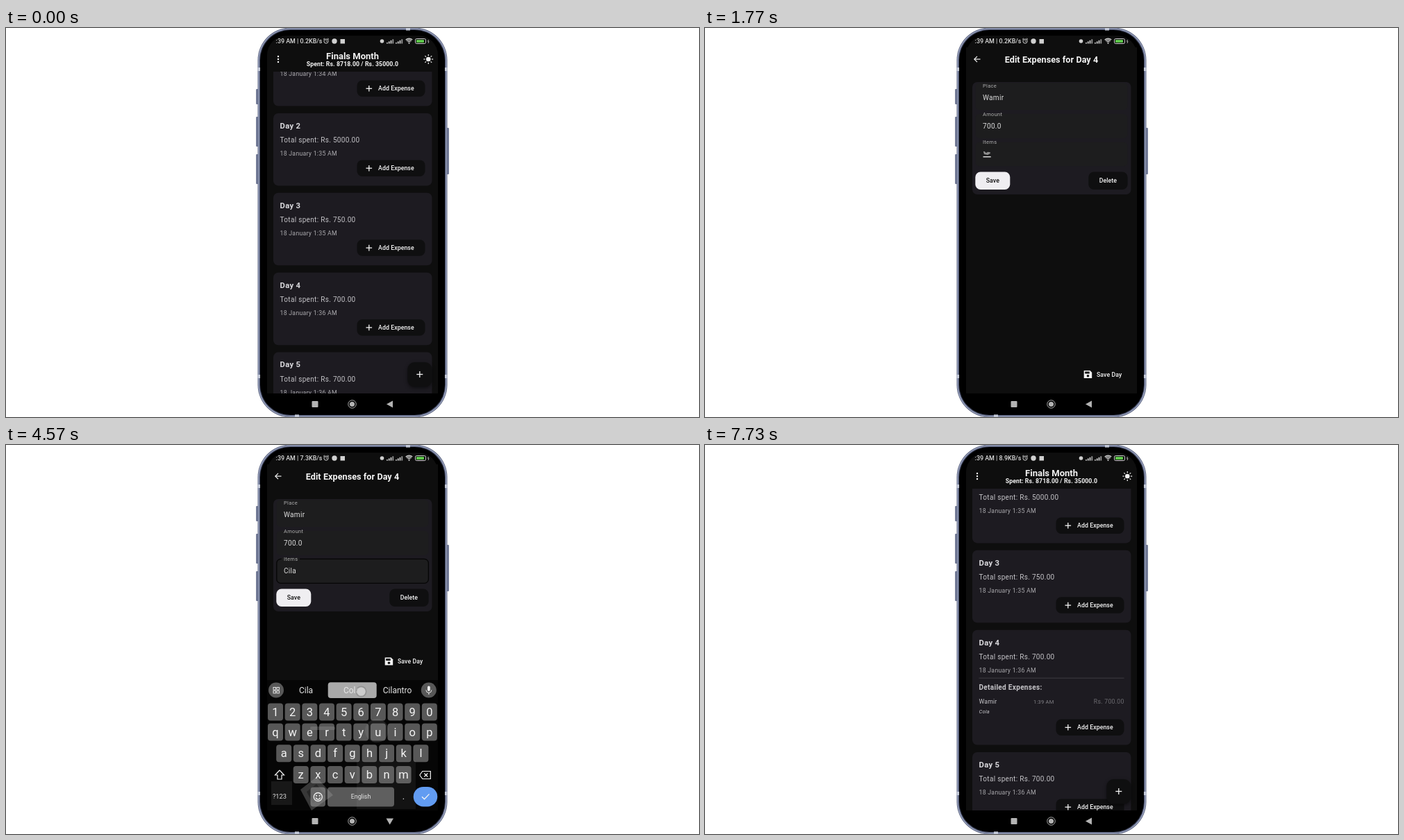
An HTML page with a canvas that plays this animation: 998x561 px, repeating every 7.76 s.

```html
<!DOCTYPE html>
<html lang="en">
<head>
<meta charset="utf-8">
<title>Expense tracker demo</title>
<style>
html, body { margin: 0; width: 100%; height: 100%; overflow: hidden; background: #fff; }
canvas { display: block; }
</style>
</head>
<body>
<canvas id="stage" width="998" height="561"></canvas>
<script>
const c = document.getElementById('stage').getContext('2d');
const LOOP = 7760, BG = '#0e0e0e', CARD = '#1d1b21', WHITE = '#f4f4f4';
const PERSON = 'Wamir';

// [start, end, x, y, end x, end y]
const TOUCHES = [
  [60, 400, 545, 400, 545, 300], [500, 600, 545, 310], [1000, 1590, 545, 327],
  [2220, 2330, 480, 182], [2800, 2880, 591, 445], [3140, 3300, 603, 476],
  [3380, 3460, 474, 476], [3560, 3660, 561, 414], [3910, 4000, 598, 445],
  [4120, 4210, 400, 445], [4490, 4730, 511.5, 355.5], [4875, 4970, 604, 507],
  [5310, 5430, 414, 220], [5970, 6080, 575, 499], [6490, 6590, 545, 310],
  [6880, 7180, 545, 330, 545, 344]
];

const clamp = v => Math.max(0, Math.min(1, v));
const ramp = (t, a, b) => { const k = clamp((t - a) / (b - a)); return 1 - (1 - k) ** 3; };

function text(s, x, y, size, color = WHITE, { w = 400, ls = 0, align = 'left', style = '' } = {}) {
  c.font = `${style} ${w} ${size}px Roboto, sans-serif`;
  c.letterSpacing = ls + 'px';
  c.textAlign = align;
  c.fillStyle = color;
  c.fillText(s, x, y);
}
function box(x, y, w, h, r, color) {
  c.fillStyle = color;
  c.beginPath();
  c.roundRect(x, y, w, h, r);
  c.fill();
}
function disc(x, y, r, color) {
  c.fillStyle = color;
  c.beginPath();
  c.arc(x, y, r, 0, 7);
  c.fill();
}
function ring(x, y, r, color, width = 1) {
  c.strokeStyle = color;
  c.lineWidth = width;
  c.beginPath();
  c.arc(x, y, r, 0, 7);
  c.stroke();
}
function path(points, color, width) {
  c.beginPath();
  for (let i = 0; i < points.length; i += 2) c.lineTo(points[i], points[i + 1]);
  if (width) { c.strokeStyle = color; c.lineWidth = width; c.stroke(); }
  else { c.fillStyle = color; c.fill(); }
}
function plus(x, y, r, width) {
  path([x - r, y, x + r, y], WHITE, width);
  path([x, y - r, x, y + r], WHITE, width);
}
function clipped(x, y, w, h, draw) {
  c.save();
  c.beginPath();
  c.rect(x, y, w, h);
  c.clip();
  draw();
  c.restore();
}

function phone() {
  for (const [y, h] of [[88, 22], [128, 43], [182, 43]]) box(360, y, 4, h, 1, '#747c98');
  box(634, 144, 4, 67, 1, '#747c98');
  const shells = [[0, '#59617d'], [.9, '#a3acc8'], [2.2, '#49506a'], [3.5, '#000']];
  for (const [d, color] of shells) box(362.5 + d, d - .5, 273 - 2 * d, 562 - 2 * d, 47 - d, color);
  for (const y of [57, 500]) { box(362.5, y, 3.5, 5, 0, '#c3c9d8'); box(632, y, 3.5, 5, 0, '#c3c9d8'); }
  box(576, 0, 6, 3.5, 0, '#c3c9d8');
  box(416, 557.5, 6, 3.5, 0, '#c3c9d8');
  box(376, 11, 246, 516, [28, 28, 0, 0], BG);
}

function statusBar(t) {
  const speed = t < 2350 ? '0.2' : t < 3900 ? '10.9' : t < 4900 ? '7.3' : '8.9';
  clipped(387.5, 8, 240, 22, () => text(`1:39 AM | ${speed}KB/s`, 383.5, 22.2, 8.9, '#dcdcdc', { w: 500 }));
  const x = speed === '10.9' ? 466 : 461, ink = '#d0d0d0';
  ring(x, 19, 3.1, ink);
  path([x, 17, x, 19.3, x + 1.6, 19.3], ink, .8);
  path([x - 4, 16.5, x - 2, 14.8], ink, 1);
  path([x + 4, 16.5, x + 2, 14.8], ink, 1);
  disc(x + 12, 19, 3.7, ink);
  if (x === 461) box(481.5, 16, 6.5, 6.5, 0, ink);
  disc(541.5, 19, 2.8, ink);
  for (const sx of [548, 561])
    for (let i = 0; i < 4; i++) box(sx + i * 2.8, 21 - i * 1.6, 1.8, 1.5 + i * 1.6, 0, i < 3 ? ink : '#999');
  for (const r of [2.5, 4.7, 6.8]) {
    c.strokeStyle = ink;
    c.lineWidth = 1.4;
    c.beginPath();
    c.arc(580.5, 22, r, -2.35, -.8);
    c.stroke();
  }
  disc(580.5, 22, 1, ink);
  c.strokeStyle = ink;
  c.lineWidth = 1;
  c.beginPath();
  c.roundRect(589.5, 15.5, 15, 7, 2);
  c.stroke();
  box(591, 17, 11, 4, 1, '#5fc74c');
  path([608.5, 17, 607.5, 19.3, 609, 19.3, 608, 22], ink, .8);
}

function navBar(keysUp) {
  const ink = '#b4b4b4';
  box(440.5, 538, 9, 9, 1, ink);
  ring(498.5, 542.5, 5.7, ink);
  disc(498.5, 542.5, 3.6, ink);
  path(keysUp ? [547.5, 538.5, 558, 538.5, 552.7, 547.5] : [557, 537.5, 557, 547.5, 548, 542.5], ink);
}

// Small grey aeroplane above a runway line
function plane(x, y, k) {
  c.save();
  c.translate(x, y);
  c.scale(k, k);
  path([-4.5, -3.5, -3, -3.5, -1, -1.5, 1, -2.8, 4, -2.5, 4.3, -1, 1, .8, -3.5, 0], '#8f8f8f');
  box(-4.8, 2.6, 9.8, 1.3, .3, '#d8d8d8');
  c.restore();
}

function dayCard(n, y, open, edited) {
  const total = ['1118', '5000', '750', '700', '700', '450'][n - 1];
  const grow = 61.3 * open;
  box(385, y, 228.5, 104.5 + grow, 7, CARD);
  text('Day ' + n, 394.5, y + 21.8, 11.27, '#d9d8dc', { w: 700, ls: .3 });
  text(`Total spent: Rs. ${total}.00`, 394.5, y + 42.4, 10.02, '#c3c2c6', { ls: .31 });
  text(`18 January 1:3${[4, 5, 5, 6, 6, 6][n - 1]} AM`, 394.5, y + 61.2, 8.77, '#aaa9ad', { ls: .25 });
  if (open > 0) clipped(385, y + 66, 228.5, 1 + grow, () => {
    box(394.5, y + 69, 209, .8, 0, '#49474d');
    text('Detailed Expenses:', 394.5, y + 86, 10.02, '#c6c5c9', { w: 700, ls: .31 });
    text(PERSON, 394.5, y + 106.6, 8.77, '#c6c5c9', { ls: .16 });
    text(`1:3${edited ? 9 : 7} AM`, 473, y + 106, 7.5, '#858489', { ls: .25 });
    text('Rs. 700.00', 603.7, y + 106.6, 8.77, '#6c6b70', { ls: .25, align: 'right' });
    if (edited) text('Cola', 394.5, y + 120.4, 7.5, '#c6c5c9', { ls: .16, style: 'italic' });
    else plane(399.3, y + 117.7, 1);
  });
  const by = y + 67.5 + grow;
  box(505.5, by, 98, 23.5, 7.5, '#0f0f10');
  plus(522.8, by + 11.8, 4.3, 1.3);
  text('Add Expense', 536, by + 14.9, 8.77, WHITE, { w: 500, ls: .06 });
}

function listPage(t) {
  const edited = t > 3000;
  const open = edited ? ramp(t, 6600, 6800) : ramp(t, 560, 780);
  const scroll = 100 * ramp(t, 60, 480) - 14 * ramp(t, 6880, 7220);
  clipped(376, 63, 246, 464, () => {
    for (let n = 1; n < 7; n++) {
      const y = 8 + 114.9 * (n - 1) - scroll + (n > 4 ? 61.3 * open : 0);
      dayCard(n, y, n === 4 ? open : 0, edited);
    }
    c.save();
    c.shadowColor = 'rgba(0,0,0,.5)';
    c.shadowBlur = 5;
    c.shadowOffsetY = 2;
    box(578.3, 482, 35.2, 35.5, 10, '#0f0f10');
    c.restore();
    plus(595.8, 499.5, 4.5, 1.3);
  });
  for (const y of [41, 45, 49]) disc(392, y, 1.2, WHITE);
  text('Finals Month', 499, 45.2, 13, WHITE, { w: 700, align: 'center' });
  text('Spent: Rs. 8718.00 / Rs. 35000.0', 499, 55.2, 8.77, WHITE, { w: 700, ls: .06, align: 'center' });
  disc(608.3, 45, 3.3, WHITE);
  for (let i = 0; i < 8; i++) {
    const u = Math.cos(i * Math.PI / 4), v = Math.sin(i * Math.PI / 4);
    path([608.3 + 4.7 * u, 45 + 4.7 * v, 608.3 + 6.9 * u, 45 + 6.9 * v], WHITE, 1.2);
  }
}

function itemText(t) {
  if (t < 3200) return null;
  if (t > 4660) return 'Cola';
  return 'Cila'.slice(0, [3420, 3610, 3950, 4160].filter(k => t > k).length);
}

function editPage(t, lift) {
  path([396.5, 45, 388, 45], WHITE, 1.2);
  path([392, 40.8, 387.8, 45, 392, 49.2], WHITE, 1.2);
  text('Edit Expenses for Day 4', 499, 49.6, 12.6, WHITE, { w: 700, ls: .06, align: 'center' });
  box(385, 78, 228.5, 162, 7, CARD);
  const item = itemText(t), focused = t > 2300 && t < 5000;
  ['Place', 'Amount', 'Items'].forEach((label, i) => {
    const y = 83 + 40.7 * i;
    box(389.5, y - (i ? 0 : 4), 219, i ? 35.2 : 39.2, 6, '#1d1d1e');
    if (i === 2 && focused) {
      c.strokeStyle = '#050505';
      c.lineWidth = 1.3;
      c.beginPath();
      c.roundRect(389.8, y, 218.6, 35, 6);
      c.stroke();
      box(397, y - 2, 26, 4, 0, '#1d1d1e');
    }
    text(label, 400, y + 2.8, 7.5, '#adadad', { ls: .3 });
    const value = [PERSON, '700.0', item][i];
    if (value !== null) text(value, 400, y + 21, 10.02, '#dedede', { ls: .31 });
  });
  if (item === null) plane(406, 182, 1.15);
  if (focused && (t + 400) % 1000 < 500) {
    const x = item === null ? 413.3 : 401 + c.measureText(item).width;
    box(x - .6, 175, 1.2, 13.5, 0, '#e8e8e8');
  }
  if (focused && t < 3140) {
    disc(413, 199.3, 6.6, '#cfc0f5');
    path([407, 196.5, 413, 189.5, 419, 196.5], '#cfc0f5');
  }
  box(389.3, 207.5, 50, 25.5, 7.5, '#efeef1');
  text('Save', 414.3, 223.4, 8.77, '#111', { w: 500, ls: .06, align: 'center' });
  box(552.3, 207.5, 56.3, 25.5, 7.5, '#0f0f10');
  text('Delete', 580.4, 223.4, 8.77, WHITE, { w: 500, ls: .06, align: 'center' });

  const y = 499.5 - lift;
  path([545.7, y - 5.5, 554.5, y - 5.5, 557.2, y - 2.8, 557.2, y + 5.5, 545.7, y + 5.5], WHITE);
  box(547.2, y - 4, 6.5, 3, 0, BG);
  disc(551.5, y + 2.3, 1.8, BG);
  text('Save Day', 564, y + 3.2, 8.77, WHITE, { w: 500, ls: .06 });
}

const KEY = 'rgba(165,165,165,.52)';
function backspace(x, y) {
  path([x - 8, y, x - 4, y - 5.5, x + 7.5, y - 5.5, x + 7.5, y + 5.5, x - 4, y + 5.5, x - 8, y], WHITE, 1.2);
  path([x - 1.5, y - 2.5, x + 3.5, y + 2.5], WHITE, 1.2);
  path([x + 3.5, y - 2.5, x - 1.5, y + 2.5], WHITE, 1.2);
}
function tick(x, y, w, h) {
  box(x - w / 2, y - h / 2, w, h, 14.2, '#629cf2');
  path([x - 5, y, x - 1.5, y + 3.5, x + 5.5, y - 3.8], WHITE, 1.3);
}
function backdrop(top) {
  box(376, top, 246, 527 - top, 0, '#060606');
  path([424, 497, 447, 479, 471, 505, 440, 527], 'rgba(255,255,255,.2)');
  path([433, 500, 447, 489, 460, 504, 442, 517], 'rgba(0,0,0,.3)');
  box(438, 406, 36, 5, 2, 'rgba(255,255,255,.16)');
  disc(534, 412, 17, 'rgba(255,255,255,.1)');
  box(382, 485, 30, 34, 0, 'rgba(255,255,255,.07)');
  box(505, 455, 85, 70, 0, 'rgba(255,255,255,.05)');
}

function numberPad() {
  backdrop(393.5);
  '123 456 789 ,0.'.split(' ').forEach((row, r) => {
    const y = 412.8 + 32.3 * r;
    [...row].forEach((ch, i) => {
      const x = 406.3 + 61.7 * i;
      box(x - 29.3, y - 14.2, 58.6, 28.4, 14.2, KEY);
      text(ch, x, y + 6.8, 19, WHITE, { align: 'center' });
    });
    if (r < 3) box(562, y - 14.2, 58.6, 28.4, 14.2, 'rgba(10,10,10,.8)');
  });
  path([587, 414, 596, 414], WHITE, 1.2);
  path([584.5, 444, 584.5, 447.5, 598.5, 447.5, 598.5, 444], WHITE, 1.2);
  backspace(591.5, 477.7);
  tick(591.4, 509.7, 58.6, 28.4);
}

function letterPad(t) {
  backdrop(339);
  disc(389, 353.5, 11, '#585858');
  for (const x of [385, 390]) for (const y of [349.5, 354.5]) {
    c.strokeStyle = WHITE;
    c.lineWidth = .9;
    c.strokeRect(x, y, 3.4, 3.4);
  }
  disc(608.8, 353.5, 11, '#585858');
  box(607, 347.5, 3.8, 7.5, 1.9, WHITE);
  c.beginPath();
  c.arc(608.9, 353.3, 4, 0, Math.PI);
  c.stroke();
  path([608.9, 357, 608.9, 360], WHITE, 1);
  if (t > 4500 && t < 4670) box(463.7, 342.3, 70, 22.8, 4, '#a9a9a9');
  if (itemText(t)) ['Cila', 'Cola', 'Cilantro'].forEach((s, i) =>
    text(s, [432, 498, 563.5][i], 357.6, 12, '#e6e6e6', { align: 'center' }));

  const rows = [['1234567890', 388, 385], ['qwertyuiop', 388, 414], ['asdfghjkl', 400.2, 444.8], ['zxcvbnm', 424.7, 475.5]];
  for (const [chars, x0, y] of rows) [...chars].forEach((ch, i) => {
    const x = x0 + 24.65 * i;
    box(x - 11, y - 12.5, 22, 25, 4, KEY);
    text(ch, x, y + 5.5, 16.5, WHITE, { align: 'center' });
  });
  path([394, 469, 387.5, 476, 391, 476, 391, 482, 397, 482, 397, 476, 400.5, 476, 394, 469], WHITE, 1.2);
  backspace(603.8, 476);
  text('?123', 394, 510.3, 9.3, '#dcdcdc', { align: 'center' });
  box(438.5, 493.5, 21.5, 28, 4, KEY);
  ring(449.3, 507.5, 6, WHITE, 1.3);
  disc(447, 505.7, 1, WHITE);
  disc(451.6, 505.7, 1, WHITE);
  c.beginPath();
  c.arc(449.3, 507.8, 3.2, .2, 2.95);
  c.stroke();
  box(463, 493.5, 96, 28, 4, KEY);
  text('English', 511, 510.4, 8.8, '#e6e6e6', { align: 'center' });
  text('.', 572.5, 511, 13, WHITE, { align: 'center' });
  tick(604, 507.2, 34.5, 28.5);
}

function touches(t) {
  for (const [a, b, x0, y0, x1 = x0, y1 = y0] of TOUCHES) {
    if (t < a || t > b) continue;
    const k = ramp(t, a, b);
    c.save();
    c.globalAlpha = Math.min(clamp((t - a) / 40), clamp((b - t) / 40));
    const x = x0 + (x1 - x0) * k, y = y0 + (y1 - y0) * k;
    disc(x, y, 8, 'rgba(120,120,120,.45)');
    disc(x, y, 6.3, 'rgba(208,208,208,.92)');
    c.restore();
  }
}

function draw(t) {
  c.fillStyle = '#fff';
  c.fillRect(0, 0, 998, 561);
  phone();
  const page = ramp(t, 1535, 1740) - ramp(t, 6040, 6290);
  const up = ramp(t, 2370, 2620) - ramp(t, 4960, 5160);
  const letters = ramp(t, 2860, 3010);
  if (page < 1) listPage(t);
  if (page > 0) clipped(376, 28, 246, 499, () => {
    c.globalAlpha = page;
    box(376, 28, 246, 499, 0, BG);
    const zoom = .92 + .08 * page;
    c.translate(499, 280);
    c.scale(zoom, zoom);
    c.translate(-499, -280);
    editPage(t, up * (124.5 + 63 * letters));
  });
  if (up > 0) clipped(376, 330, 246, 197, () => {
    c.translate(0, (1 - up) * 190);
    if (letters > 0) {
      c.translate(0, (1 - letters) * 54);
      letterPad(t);
    } else numberPad();
  });
  statusBar(t);
  navBar(up > .2);
  touches(t);
}

const begin = performance.now();
function tickFrame() {
  draw((performance.now() - begin) % LOOP);
  requestAnimationFrame(tickFrame);
}
tickFrame();
</script>
</body>
</html>
```
